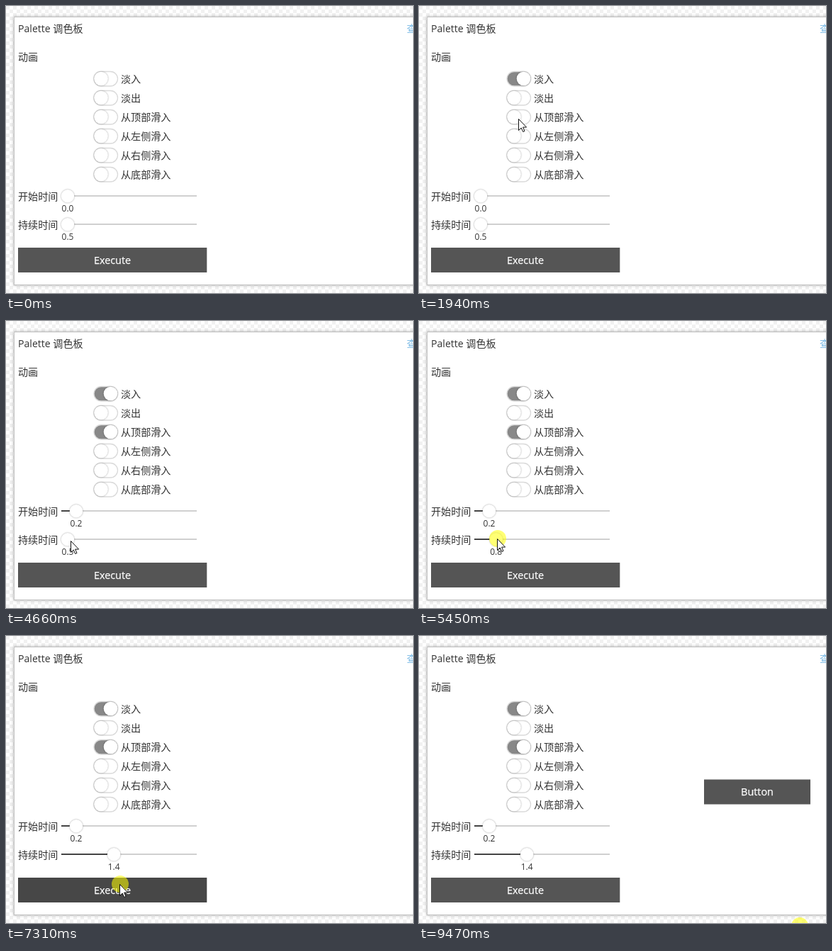
Recreate the animation shown at these times as an HTML page. Size 574 by 405 pixels, loop 9550 ms.

```html
<!DOCTYPE html>
<html lang="zh-CN">
<head>
<meta charset="utf-8">
<title>Palette 调色板</title>
<style>
  html, body { margin: 0; width: 100%; height: 100%; overflow: hidden; background: #fff; }
  svg { display: block; width: 574px; height: 405px; }
  text { font: 14.1px "Open Sans", "Noto Sans CJK SC", "Noto Sans CJK", sans-serif; fill: #333; }
  .mid { text-anchor: middle; }
  .value { font-size: 12px; }
  .on-dark { font-size: 14.4px; fill: #fff; stroke: #fff; stroke-width: .25; }
  .link { fill: #7dbbe6; }
  .panel { fill: #fff; stroke: #c2c2c2; filter: drop-shadow(0 0 2px rgba(0, 0, 0, .3)); }
  .pill { stroke: #dadada; stroke-width: 1.3; }
  .knob { fill: #fff; filter: drop-shadow(0 .7px 1.3px rgba(0, 0, 0, .36)); }
  .rail { fill: #d0d0d0; }
  .filled { fill: #444; }
</style>
</head>
<body>
<svg viewBox="0 0 574 405">
  <defs>
    <pattern id="checker" width="10" height="10" patternUnits="userSpaceOnUse">
      <path d="M0 0h5v10h5v-5h-10z" fill="#f1f1f1"/>
    </pattern>
  </defs>
  <rect width="574" height="405" fill="#fff"/>
  <rect width="574" height="405" fill="url(#checker)"/>
  <rect class="panel" x="11.5" y="15.5" width="600" height="378"/>
  <text x="17" y="37">Palette 调色板</text>
  <text x="565" y="37" class="link">查看</text>
  <text x="17" y="77">动画</text>
  <g id="toggles"></g>
  <g id="sliders"></g>
  <rect id="execute" x="17" y="341" width="266.3" height="35"/>
  <text x="150" y="364" class="mid on-dark">Execute</text>
  <g id="preview">
    <rect x="402" y="202.5" width="150" height="35" fill="#555"/>
    <text x="477" y="225" class="mid on-dark">Button</text>
  </g>
  <g id="pointer">
    <circle id="halo" r="12" fill="#ff0" fill-opacity=".55"/>
    <path d="M-.5 .5V16.5L3.2 13L5.7 18.5L8 17.5L5.6 12.1H10.6Z" fill="#fff" stroke="#111"/>
  </g>
</svg>
<script>
const LOOP = 9550;
const $ = id => document.getElementById(id);
const clamp = (v, lo, hi) => Math.min(hi, Math.max(lo, v));
const ramp = (t, from, to) => clamp((t - from) / (to - from), 0, 1);
const gray = v => `rgb(${v},${v},${v})`;

// Mouse button held: [down, up]
const press = {
  fadeIn: [920, 1090],
  fromTop: [2340, 2430],
  start: [3590, 4060],
  span: [4990, 6840],
  execute: [7310, 7390],
  stop: [9470, LOOP]
};

// Pointer moves: begin, end, x, y
const home = { x: 291, y: 235 };
const moves = [
  [70, 920, 142, 99], [1090, 1560, 142, 160], [1790, 2170, 140, 157],
  [2480, 2900, 146, 269], [2900, 3420, 88, 267], [3590, 3970, 100, 267],
  [4130, 4660, 92, 310], [4750, 4910, 89, 307],
  [4990, 5220, 111, 307], [5600, 5990, 139, 306], [6220, 6540, 157, 306],
  [6840, 7390, 161, 353], [8680, 9010, 230, 412], [9010, 9400, 537, 409]
];

function pointerAt(t) {
  return moves.reduce((p, [begin, end, x, y]) => {
    const r = ramp(t, begin, end), e = r * r * (3 - 2 * r);
    return { x: p.x + (x - p.x) * e, y: p.y + (y - p.y) * e };
  }, home);
}

function group(parent, markup) {
  const g = document.createElementNS("http://www.w3.org/2000/svg", "g");
  g.innerHTML = markup;
  return parent.appendChild(g);
}

function toggle(label, row, click) {
  const y = 102.5 + 27 * row;
  const g = group($("toggles"), `
    <rect class="pill" x="124" y="${y - 10}" width="33.5" height="20.5" rx="10.2"/>
    <circle class="knob" cy="${y}" r="9.8"/>
    <text x="162" y="${y + 5.5}">${label}</text>`);
  const [pill, knob] = g.children;
  return t => {
    const on = click ? ramp(t, click[1], click[1] + 160) : 0;
    pill.setAttribute("fill", gray(255 - 119 * on));
    knob.setAttribute("cx", 134 + 13.5 * on);
  };
}

// Dragging snaps to whole steps of 0.1, each `step` pixels wide
function slider(label, y, min, step, [down, up]) {
  const g = group($("sliders"), `
    <text x="17" y="${y + 6}">${label}</text>
    <rect class="rail" x="78" y="${y - 1}" width="191" height="2"/>
    <rect class="filled" x="78" y="${y - 1}" height="2"/>
    <circle class="knob" cy="${y + .3}" r="9.2"/>
    <text class="mid value" y="${y + 22}"></text>`);
  const [, , filled, knob, value] = g.children;
  const grabbed = pointerAt(down).x;
  return t => {
    const dragged = pointerAt(clamp(t, down, up)).x - grabbed;
    const n = Math.floor(dragged / step + .01), x = 87 + n * step;
    filled.setAttribute("width", x - 78);
    knob.setAttribute("cx", x);
    value.setAttribute("x", x);
    value.textContent = (min + n / 10).toFixed(1);
  };
}

function executeButton(t) {
  const hover = ramp(t, 6900, 7180) - ramp(t, 8790, 9000);
  const pressed = ramp(t, ...press.execute) - ramp(t, 8790, 9000);
  $("execute").setAttribute("fill", gray(85 - 14 * hover - 10 * pressed));
}

function preview(t) {
  const shown = ramp(t, 7530, 8930);
  $("preview").setAttribute("opacity", shown);
  $("preview").setAttribute("transform", `translate(0 ${-20 * (1 - shown)})`);
}

function pointer(t) {
  const { x, y } = pointerAt(t);
  const held = Object.values(press).some(([down, up]) => t >= down && t < up);
  $("pointer").setAttribute("transform", `translate(${Math.round(x)} ${Math.round(y)})`);
  $("pointer").setAttribute("visibility", t < 70 ? "hidden" : "visible");
  $("halo").setAttribute("opacity", held ? 1 : 0);
}

const clicks = { 0: press.fadeIn, 2: press.fromTop };
const parts = [
  ...["淡入", "淡出", "从顶部滑入", "从左侧滑入", "从右侧滑入", "从底部滑入"]
    .map((label, row) => toggle(label, row, clicks[row])),
  slider("开始时间", 268, 0, 6, press.start),
  slider("持续时间", 308, .5, 7.24, press.span),
  executeButton, preview, pointer
];

const began = performance.now();
function frame() {
  const t = (performance.now() - began) % LOOP;
  parts.forEach(draw => draw(t));
  requestAnimationFrame(frame);
}
frame();
</script>
</body>
</html>
```
